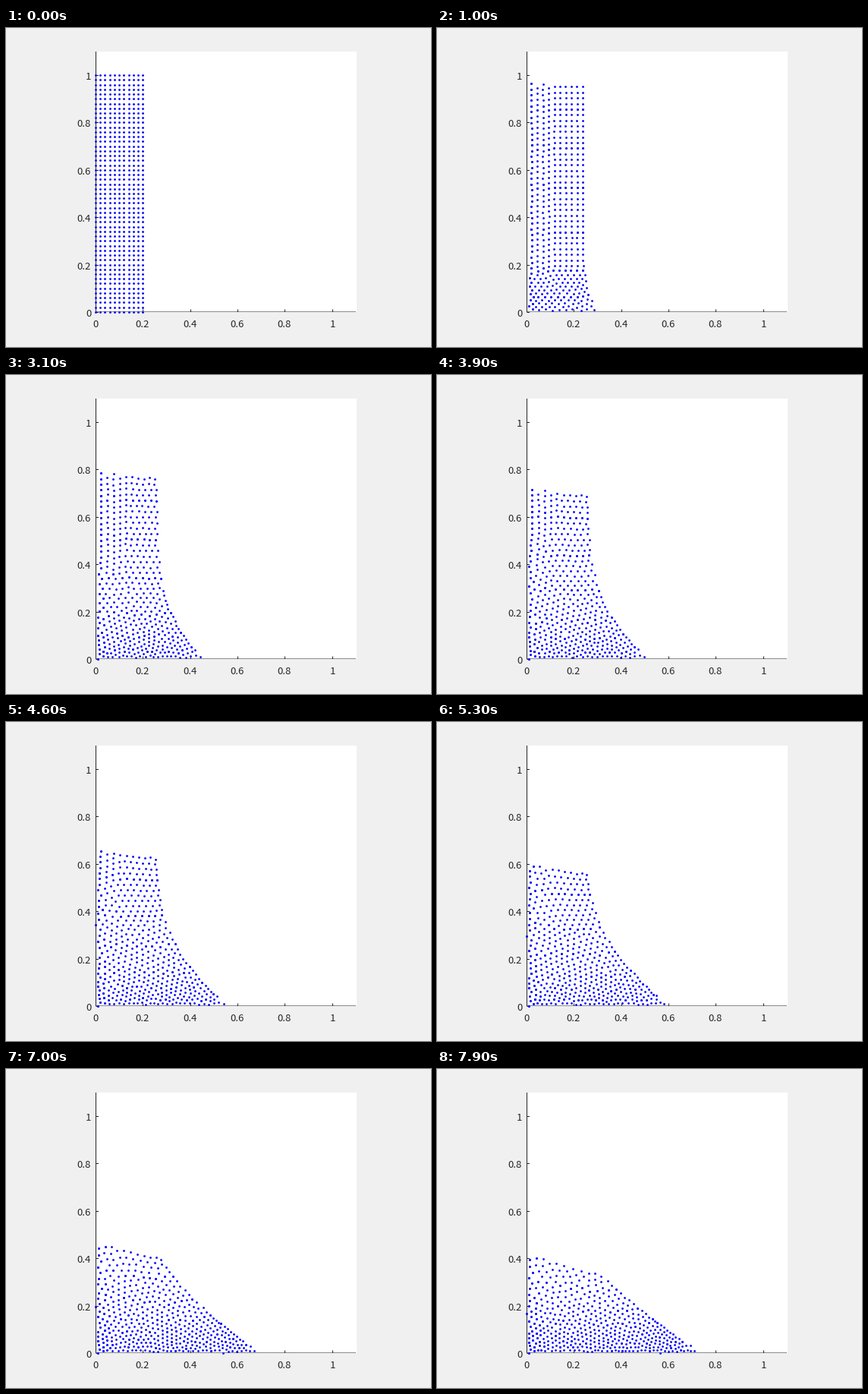
Recreate the animation shown at these times as a matplotlib script. Size 560 by 420 pixels, loop 8000 ms.

```python
import numpy as np
import matplotlib.pyplot as plt
from matplotlib.animation import FuncAnimation
from matplotlib.patches import Rectangle

W, H = 560, 420
FRAMES, STEP = 80, 100
START = 10                         # the column falls freely until here
COLS, BASE, UPPER = 10, 11, 34
ROWS = BASE + UPPER
COUNT = COLS * ROWS
X0, Y0, UNIT = 118.5, 374.4, 311.8  # data origin and scale in pixels
DARK = "#262626"
rng = np.random.default_rng(4)


# Free surface, m frames after the free fall
def top(m):
    return 0.965 - 0.0085 * m + 0.04 * (m / 69) ** 10


def cap(m, x):
    return top(m) - (0.04 + 0.23 * (m / 69) ** 1.6) * x


def width(m, y):
    side = 0.262 - 0.024 * np.exp(-m / 8)
    toe = 0.305 + 0.0084 * m - 0.000031 * m * m
    bend = 0.8 + 8.2 * np.exp(-m / 25)
    return side + (toe - side) * np.clip(1 - y / top(m), 0, 1) ** bend


def front(m):
    """Height up to which the orderly column has broken up."""
    return 0.17 + 0.013 * m


def spacing(m):
    area = 0.98 * top(m) * width(m, np.linspace(0, top(m), 80)).mean()
    return np.sqrt(area / COUNT / 0.866)


def margin(low, high):
    """Distance kept from a wall; a few particles touch it."""
    gap = rng.uniform(low, high, COUNT)
    return np.where(rng.random(COUNT) < 0.07, 0, gap)


floor = margin(0.006, 0.014)
wall = margin(0.009, 0.018)
edge = margin(0, 0.014)


def relax(x, y, m, rounds):
    """Push close neighbours apart inside the free surface."""
    reach = 1.15 * spacing(m)
    for _ in range(rounds):
        lean = 6 * np.maximum(0, x - 0.1) * min(1, m / 13)
        free = np.clip((front(m) + lean - y) / 0.06 + 0.5, 0, 1)
        size = reach * (0.78 + 0.34 * np.minimum(y / 0.4, 1))
        dx = x[:, None] - x
        dy = y[:, None] - y
        r = np.sqrt(dx * dx + dy * dy) + 1e-6
        push = 0.13 * np.maximum((size[:, None] + size) / 2 - r, 0) / r
        x = x + free * (push * dx).sum(1)
        y = y + free * (push * dy).sum(1)
        y = np.clip(y, floor, cap(m, x) - edge * free)
        x = np.clip(x, wall, width(m, y) - edge * free)
    return x, y


def first_state():
    i = np.arange(COLS)
    j = np.arange(BASE)[:, None]
    by = 0.01 + 0.0145 * j + 0 * i
    bx = (i + 0.5 + 0.25 * (-1.0) ** j) / COLS * width(0, by)
    k = np.arange(UPPER)[:, None]
    uy = 0.172 + 0.0236 * k + np.where(i < 4, 0.004 + 0.009 * (-1.0) ** i, 0)
    ux = 0.021 + 0.0241 * i + 0 * k
    x = np.vstack([bx, ux]).ravel() + rng.normal(0, 0.0006, COUNT)
    y = np.vstack([by, uy]).ravel()
    return relax(x, y, 0, 30)


def simulate():
    x, y = first_state()
    states = [(x, y)]
    for m in range(FRAMES - 1 - START):
        depth = min(front(m), 0.7 * top(m))
        fall = cap(m + 1, x) - cap(m, x)
        ny = y + fall * np.minimum(1, y / depth)
        x = x * width(m + 1, ny) / width(m, y)
        x, y = relax(x, ny, m + 1, 6)
        states.append((x, y))
    return states


states = simulate()

# Starting grid; neighbours that merge share one moving particle
row, col = [a.ravel() for a in np.mgrid[0:51, 0:11]]
grid_x, grid_y = 0.02 * col, 0.02 * row
member = (np.rint(row * (ROWS - 1) / 50).astype(int) * COLS
          + np.maximum(col - 1, 0))


def particles(n):
    x, y = states[max(n - START, 0)]
    k = min(n / START, 1)
    return (grid_x + (x[member] - grid_x) * k,
            grid_y + (y[member] - grid_y) * k * k)


fig = plt.figure(figsize=(7, 5.25), dpi=80, facecolor="#f0f0f0")
ax = fig.add_axes([0, 0, 1, 1])
ax.set_xlim(0, W)
ax.set_ylim(H, 0)
ax.axis("off")


def line(xs, ys, color=DARK):
    ax.plot(xs, ys, color=color, lw=0.9, snap=False, solid_capstyle="butt")


def label(x, y, text, ha):
    ax.text(x, y, text, ha=ha, va="baseline", color=DARK,
            fontsize=13.2 * 0.9, fontname="Noto Sans CJK JP")


ax.add_patch(Rectangle((118, 31), 344, 343, fc="white", ec="none"))
line([118, 461], [373.5, 373.5], "#8c8c8c")
line([118.5, 118.5], [31, 374])
for i in range(6):
    text = f"{i / 5:g}"
    tx = int(X0 + UNIT * i / 5) + 0.5
    ty = int(Y0 - UNIT * i / 5) + 0.5
    line([tx, tx], [374, 370.5])
    line([118.5, 122], [ty, ty])
    label(tx - 0.5, 394, text, "center")
    label(112.2, ty + 5.3, text, "right")

dots = ax.scatter(grid_x, grid_y, s=np.full(grid_x.size, 6.4),
                  color="#0000ff", linewidths=0, clip_on=False, zorder=5)


def update(n):
    x, y = particles(n)
    px = np.floor(X0 + UNIT * x) + 0.5
    py = np.floor(Y0 - UNIT * y) + 0.5
    dots.set_offsets(np.column_stack([px, py]))
    return dots,


anim = FuncAnimation(fig, update, frames=FRAMES, interval=STEP,
                     repeat=True, repeat_delay=0)
plt.show()
```
